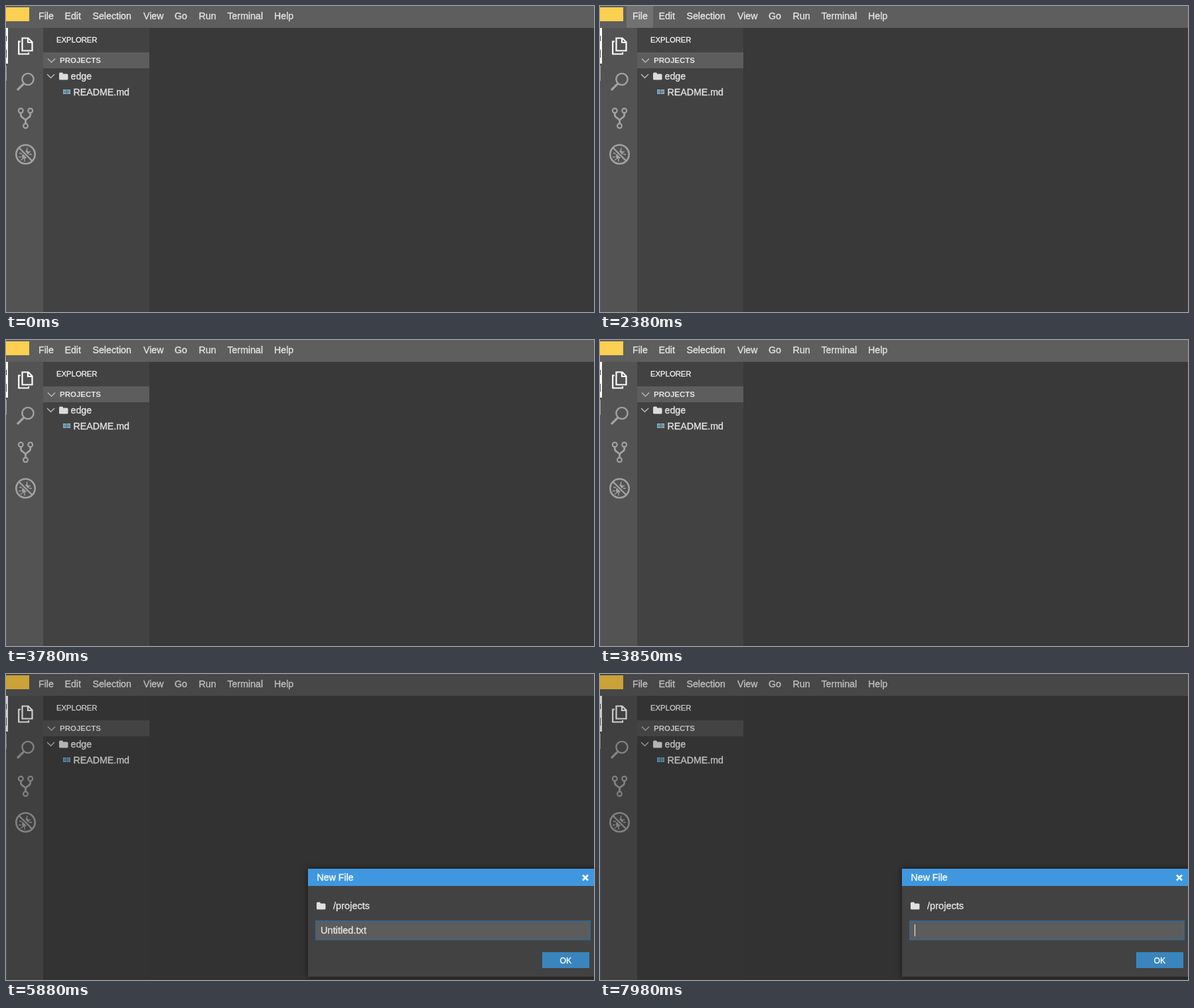
Write an HTML page with a canvas that moves like this. It is 886x462 px and loops after 8000 ms.

```html
<!DOCTYPE html>
<html lang="en">
<head>
<meta charset="utf-8">
<title>New File</title>
<style>
html, body { margin: 0; width: 100%; height: 100%; overflow: hidden; background: #383838; }
canvas { display: block; }
</style>
</head>
<body>
<canvas id="stage" width="886" height="462"></canvas>
<script>
const W = 886, H = 462, LOOP = 8000;
const ctx = document.getElementById('stage').getContext('2d');
const FAMILY = '"Liberation Sans", Arial, sans-serif';

const TIME = {
  hover: 1260, menuOpen: 2520, menuClose: 3640, dialog: 3920,
  erase: 6930, eraseStep: 70
};
const CARET_OFF = [[4830, 5320], [5850, 6300], [6800, 6860]];
const FILE_NAME = 'Untitled.txt';

const BRIGHT = {
  bar: '#5e5e5e', activity: '#535353', side: '#424242', editor: '#393939',
  header: '#5d5d5d', logo: '#fcd050', text: '#e4e4e4', title: '#f4f4f4',
  icon: '#a2a2a2', active: '#ffffff', folder: '#dcdcdc', chevron: '#b8b8b8',
  book: '#7fabc4', edge: '#555866'
};
const DIM = {
  bar: '#474747', activity: '#404040', side: '#333333', editor: '#323232',
  header: '#434343', logo: '#c9a238', text: '#bebebe', title: '#c8c8c8',
  icon: '#818181', active: '#cecece', folder: '#b4b4b4', chevron: '#949494',
  book: '#5585a3', edge: '#454854'
};

function rect(x, y, w, h, color) {
  ctx.fillStyle = color;
  ctx.fillRect(x, y, w, h);
}

// A hairline stroke gives the type its slightly heavier weight.
function text(str, x, y, color, size = 14.2, weight = 400) {
  ctx.font = `${weight} ${size}px ${FAMILY}`;
  ctx.fillStyle = ctx.strokeStyle = color;
  ctx.lineWidth = 0.35;
  ctx.lineJoin = 'round';
  ctx.fillText(str, x, y);
  if (weight < 600) ctx.strokeText(str, x, y);
  ctx.lineJoin = 'miter';
  return ctx.measureText(str).width;
}

function path(d, color, width, x = 0, y = 0) {
  ctx.save();
  ctx.translate(x, y);
  ctx.strokeStyle = color;
  ctx.lineWidth = width;
  ctx.stroke(new Path2D(d));
  ctx.restore();
}

function ring(x, y, r, color, width) {
  ctx.beginPath();
  ctx.arc(x, y, r, 0, Math.PI * 2);
  ctx.strokeStyle = color;
  ctx.lineWidth = width;
  ctx.stroke();
}

function shadowed(x, y, w, h, color, blur) {
  ctx.save();
  ctx.shadowColor = 'rgba(0,0,0,.6)';
  ctx.shadowBlur = blur;
  rect(x, y, w, h, color);
  ctx.restore();
}

function folder(x, y, color) {
  ctx.save();
  ctx.translate(x, y);
  ctx.fillStyle = color;
  ctx.fill(new Path2D('M0 1.5Q0 0 1.5 0H4.5Q6 0 6 2H12Q13.5 2 13.5 3.5V9.5Q13.5 11 12 11H1.5Q0 11 0 9.5Z'));
  ctx.restore();
}

function activityIcons(c) {
  path('M24.5 48.5H33.5L39.5 54.5V67.5H24.5ZM33 48.5V55H39.5', c.active, 2.2);
  path('M22 53.5H19.2V72.5H34V70', c.active, 2.2);

  ring(33, 110.5, 8.6, c.icon, 2.4);
  path('M27 117L17 127', c.icon, 3.2);

  for (const [x, y] of [[22.3, 158], [36.7, 158], [29.5, 181]]) ring(x, y, 3.4, c.icon, 2.1);
  path('M22.3 161.5V164Q22.3 167 25 168.5L29.5 172L34 168.5Q36.7 167 36.7 164V161.5M29.5 171V177.5', c.icon, 2.8);

  ring(29.5, 224, 14.2, c.icon, 2.6);
  path('M19.5 214L39.5 234', c.icon, 2.4);
  path('M31 219L32 214M33 221L37 220M35 224H39M23 228H19M26 230L22 233M28 231V235M24 223L20 222', c.icon, 1.4);
  ctx.fillStyle = c.icon;
  ctx.fill(new Path2D('M29 219Q33 216 34.5 221Q35 224 33 224ZM25 223L31 229Q28 232 25 230Q23 227 25 223Z'));
}

function workbench(c, fileLit) {
  rect(0, 0, W, H, c.editor);
  rect(0, 33, 56, H - 33, c.activity);
  rect(56, 33, 160, H - 33, c.side);
  rect(0, 0, W, 33, c.bar);
  if (fileLit) rect(40, 0, 40, 33, '#727272');
  rect(0, 2, 35, 21, c.logo);

  rect(0, 113, 1.5, H - 113, c.edge);
  rect(0, 33, 3, 54, c.active);
  rect(0, 45, 1, 8, '#444');
  rect(0, 66, 1, 12, '#555');
  rect(0, 90, 1, 23, c.icon);

  const names = { File: 49, Edit: 88.5, Selection: 130.5, View: 207, Go: 254, Run: 290.5, Terminal: 333.5, Help: 404 };
  for (const name in names) text(name, names[name], 20, c.text);

  activityIcons(c);
  text('EXPLORER', 76, 55, c.title, 11.3);
  rect(56, 70, 160, 24, c.header);
  path('M0 0L5.5 5.5L11 0', c.chevron, 1.5, 63, 79.5);
  text('PROJECTS', 81, 86, c.text, 11.5, 700);
  path('M0 0L5.5 5.5L11 0', c.chevron, 1.5, 62, 103);
  folder(80, 100.5, c.folder);
  text('edge', 97.5, 111, c.text);
  rect(86, 126, 11, 7, c.book);
  path('M91.5 126V134M87.5 128.5H90.5M87.5 130.5H90.5M92.5 128.5H95.5M92.5 130.5H95.5', c.side, 0.7);
  text('README.md', 101.5, 135, c.text);
}

const KEY_SHAPES = {
  opt: 'M0 1.5H4.2L8.4 10.5H13M7.8 1.5H13',
  cmd: 'M4.5 4.2H8.5V7.8H4.5ZM4.5 4.2H2.8A1.8 1.8 0 1 1 4.5 2.4ZM8.5 4.2V2.4A1.8 1.8 0 1 1 10.2 4.2Z' +
       'M8.5 7.8H10.2A1.8 1.8 0 1 1 8.5 9.6ZM4.5 7.8V9.6A1.8 1.8 0 1 1 2.8 7.8Z',
  shift: 'M6.5 .8L12 6.5H9.2V11H3.8V6.5H1Z'
};
const MENU = [
  [48, 'New File', 'opt N'], [74, 'New Folder'],
  [110, 'Open...', 'opt cmd O'], [137, 'Open Workspace...'],
  [163, 'Open Workspace Roots...', 'opt cmd W'],
  [189, 'Open Recent Workspace...'],
  [215, 'Open Recent Workspace Roots...', 'opt cmd R'],
  [241, 'Save Workspace As...'], [268, 'Save Workspace Roots As...'],
  [304, 'Save', 'cmd S'], [330, 'Save All', 'opt cmd S'], [356, 'Save As...', 'shift cmd S'],
  [392, 'Auto Save'], [428, 'Download'], [464, 'Settings']
];

function shortcut(keys, y) {
  const parts = keys.split(' ');
  const letter = parts.pop();
  ctx.font = `14.2px ${FAMILY}`;
  let x = 368.5 - ctx.measureText(letter).width;
  text(letter, x, y + 5, '#e6e6e6');
  for (const key of parts.reverse()) {
    x -= 17.7;
    path(KEY_SHAPES[key], '#e0e0e0', 1.4, x, y - 6);
  }
}

function fileMenu() {
  shadowed(40, 31, 350, H, '#424242', 6);
  for (const [y, label, keys] of MENU) {
    text(label, 71.5, y + 5, '#e6e6e6');
    if (keys) shortcut(keys, y);
  }
  for (const y of [92, 285, 374, 410, 446]) rect(40, y, 350, 1, '#cacaca');
  path('M50.5 392L54.5 396L61.5 388.5', '#e8e8e8', 3);
  path('M373.5 459.5L377 463L373.5 466.5', '#e0e0e0', 1.8);
}

function dialog(t) {
  shadowed(455, 294, 440, 163, '#424242', 8);
  rect(455, 294, W - 455, 26, '#3f97e0');
  text('New File', 468.5, 312, '#ffffff');
  path('M869 303.5L877 311.5M877 303.5L869 311.5', '#ffffff', 2.6);

  folder(468, 344.5, '#e0e0e0');
  text('/projects', 493, 355, '#e4e4e4', 14.6);

  rect(466, 372, 415, 30, '#2e6699');
  rect(467.5, 373.5, 412, 27, '#5c5c5c');
  const erased = Math.max(0, Math.floor((t - TIME.erase) / TIME.eraseStep) + 1);
  const name = FILE_NAME.slice(0, Math.max(0, FILE_NAME.length - erased));
  const width = text(name, 474, 392, '#e4e4e4', 14.6);
  const hidden = CARET_OFF.some(([from, to]) => t >= from && t < to);
  if (!hidden) rect(Math.round(474 + width), 378, 1, 18, '#f4f4f4');

  rect(808, 420, 71, 24, '#3a85bd');
  text('OK', 834.5, 437, '#ffffff', 12.2);
}

function draw(now) {
  const t = now % LOOP;
  const asking = t >= TIME.dialog;
  workbench(asking ? DIM : BRIGHT, t >= TIME.hover && t < TIME.menuClose);
  if (t >= TIME.menuOpen && t < TIME.menuClose) fileMenu();
  if (asking) dialog(t);
}

const start = performance.now();
function tick() {
  draw(performance.now() - start);
  requestAnimationFrame(tick);
}
tick();
</script>
</body>
</html>
```
